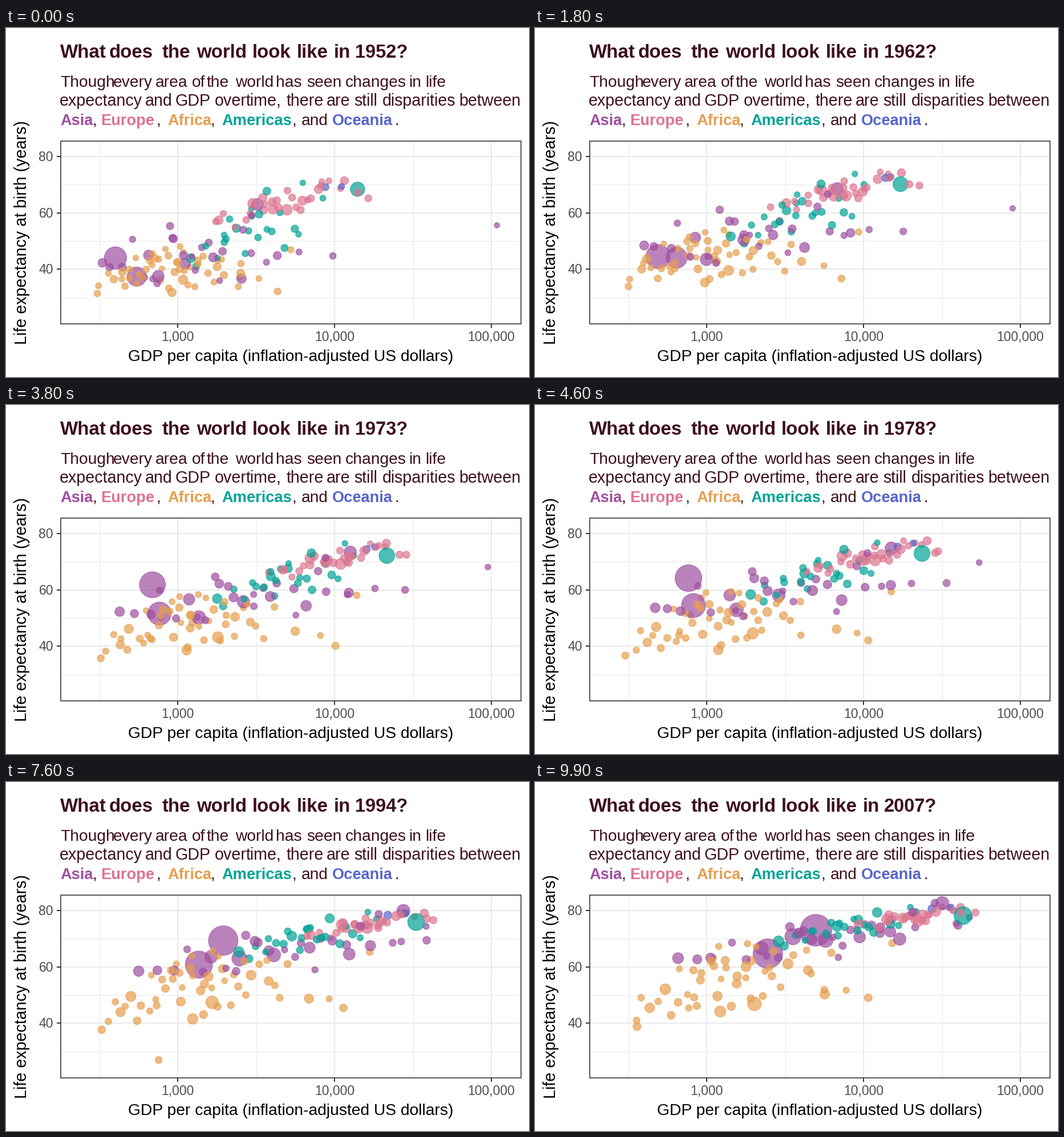
These frames come from a looping animation (917x611 px, 10000 ms). A matplotlib script:

```python
import numpy as np
import matplotlib.pyplot as plt
from matplotlib.animation import FuncAnimation
from matplotlib.patches import Rectangle

W, H, FRAMES = 917, 611, 100
PT = 0.72  # points per pixel at 100 dpi
INK, GREY, LINE, GRID = "#3d0f1d", "#4d4d4d", "#333333", "#ebebeb"
COLORS = {"Asia": "#9e4f9f", "Europe": "#dc758f", "Africa": "#e69f4f",
          "Americas": "#00a396", "Oceania": "#5766c9"}
AS, EU, AF, AM, OC = COLORS

# Region, first and last population (millions), key points (year, income, life).
LANDMARKS = [
    (AS, 556, 1319, (1952, 400, 44), (1957, 576, 50.5), (1962, 488, 44.5),
     (1967, 613, 58.4), (1977, 741, 64), (1992, 1656, 68.7), (2007, 4960, 73)),
    (AS, 372, 1110, (1952, 547, 37.4), (1977, 813, 54.2), (1987, 977, 58.6), (2007, 2450, 64.7)),
    (AS, 82, 224, (1952, 750, 37.5), (2007, 3540, 70.7)),
    (AS, 86, 127, (1952, 3220, 63), (1967, 9850, 71.4), (1992, 26800, 79.4), (2007, 31700, 82.6)),
    (AS, .2, 2.5, (1952, 108400, 55.6), (1967, 80900, 64.6), (1972, 109000, 67.7),
     (1982, 31400, 71.3), (2007, 47300, 77.6)),
    (AF, 33, 135, (1952, 1080, 36.3), (1977, 1980, 44.5), (1992, 1600, 47.5), (2007, 2010, 46.9)),
    (AF, 2.5, 9, (1952, 493, 40), (1987, 848, 44), (1992, 737, 23.6), (2007, 863, 46.2)),
    (AM, 158, 301, (1952, 14000, 68.4), (2007, 43000, 78.2)),
]

# Region, count, mid-period boom in income, typical populations, then at start and end:
# mean log income, its spread, mean life, slope of life over log income, spread of life.
CROWDS = [
    (AS, 23, 0, 9, 24, (3.02, .28, 45, 13, 6), (3.68, .46, 70, 11, 3)),
    (AS, 5, .2, 4, 15, (3.62, .25, 43.5, 15, 3), (4.2, .25, 71.5, 17, 2)),
    (EU, 30, 0, 8, 10, (3.7, .25, 64, 13, 2.4), (4.33, .19, 77.5, 9, 1)),
    (AF, 46, 0, 2.7, 9, (2.95, .23, 39.5, 5, 4), (3.14, .31, 55.5, 15, 6)),
    (AF, 4, .2, 4, 10, (3.57, .12, 38.7, 10, 5), (3.96, .16, 55, 30, 6)),
    (AM, 24, 0, 3.5, 9, (3.47, .21, 54, 22, 5), (3.9, .24, 74, 9, 2)),
    (OC, 2, 0, 4, 9, (4.01, .02, 69.2, 0, .2), (4.47, .09, 80.7, 7, .2)),
]

KEYS = np.arange(1952, 2008, 5)
T = np.linspace(0, 1, len(KEYS))
rng = np.random.default_rng(12)


def radii(p0, p1):
    return 4.5 + 0.64 * (np.sqrt(p0) * (1 - T) + np.sqrt(p1) * T)


def landmark(p0, p1, *points):
    year, income, life = np.array(points).T
    return (np.interp(KEYS, year, np.log10(income)),
            np.interp(KEYS, year, life), radii(p0, p1))


def scores(n):
    """Evenly spread, bell-like scores in random order."""
    q = (2 * np.arange(n) + 1) / n - 1
    return rng.permutation(1.3 * q + 0.8 * q ** 3)


def crowd(n, boom, p0, p1, start, end):
    gain = T ** 0.7  # early years bring most of the progress
    mean, sx, life, slope, sy = (a + (b - a) * gain for a, b in zip(start, end))
    for u, v, size in zip(scores(n), scores(n), np.exp(scores(n))):
        dx = sx * u
        x = mean + dx + boom * np.sin(np.pi * T) + rng.normal(0, 0.02, len(T))
        y = life + slope * dx + sy * v + rng.normal(0, 0.4, len(T))
        yield x, y, radii(p0 * size, p1 * size)


def build():
    dots = [(i / len(LANDMARKS), region, landmark(*spec))
            for i, (region, *spec) in enumerate(LANDMARKS)]
    for region, *spec in CROWDS:
        dots += [(rng.random(), region, path) for path in crowd(*spec)]
    dots.sort(key=lambda d: d[0])
    return [COLORS[d[1]] for d in dots], np.array([d[2] for d in dots])


def px(log_income):
    return 301.3 + 274.9 * (log_income - 3)


def py(life):
    return 225 + 4.935 * (80 - life)


plt.rcParams["font.family"] = "Liberation Sans"
fig = plt.figure(figsize=(W / 100, H / 100), dpi=100, facecolor="white")
ax = fig.add_axes([0, 0, 1, 1])
ax.set(xlim=(0, W), ylim=(H, 0))
ax.axis("off")

LEFT, RIGHT, TOP, BOTTOM = 95.5, 902.5, 198, 517.5


def line(xs, ys, color, width):
    ax.plot(xs, ys, color=color, lw=width * PT, zorder=1, solid_capstyle="butt")


def label(x, y, s, size, color="black", **kw):
    return ax.text(x, y, s, fontsize=size * PT, color=color, va="baseline", **kw)


def words(y, size, text, starts, **kw):
    for x, s in zip(starts, text.split()):
        label(x, y, s, size, INK, **kw)


for half in range(5, 11):
    x = px(half / 2)
    major = half % 2 == 0
    line((x, x), (TOP, BOTTOM), GRID, 2.2 if major else 1.1)
    if major:
        line((x, x), (BOTTOM, BOTTOM + 7), LINE, 2)
        label(x, 548, f"{10 ** (half // 2):,}", 23, GREY, ha="center")

for life in range(30, 81, 10):
    y = py(life)
    major = life % 20 == 0
    line((LEFT, RIGHT), (y, y), GRID, 2.2 if major else 1.1)
    if major:
        line((LEFT - 7, LEFT), (y, y), LINE, 2)
        label(83, y + 8, str(life), 23, GREY, ha="right")

ax.add_patch(Rectangle((LEFT, TOP), RIGHT - LEFT, BOTTOM - TOP, fill=False,
                       ec=LINE, lw=1.6 * PT, zorder=4))
label(499, 583, "GDP per capita (inflation-adjusted US dollars)", 28.3, ha="center")
label(36, 357.5, "Life expectancy at birth (years)", 28.6, ha="center",
      rotation=90, rotation_mode="anchor")

words(52, 33.2, "What does the world look like in",
      (95, 181, 274, 334, 432, 510, 575), weight="bold")
year_text = label(612, 52, "", 32.6, INK, weight="bold")
words(103, 28.2, "Though every area of the world has seen changes in life",
      (95, 188, 262, 326, 352, 402, 473, 527, 595, 706, 735))
words(136.5, 28.6, "expectancy and GDP over time, there are still disparities between",
      (94, 244, 297, 366, 421, 492, 562, 610, 660, 794))
for x, region in zip((95, 166, 283, 378, 572), COLORS):
    label(x, 170, region, 27.3, COLORS[region], weight="bold")
words(170, 28, ", , , , and .", (151, 263, 358, 501, 518, 682))

colors, paths = build()
dots = ax.scatter(px(paths[:, 0, 0]), py(paths[:, 1, 0]), c=colors, alpha=0.7,
                  linewidths=1.2 * PT, zorder=3)


def draw(i):
    year = 1952 + 55 * i / (FRAMES - 1)
    k = min(int((year - 1952) / 5), len(KEYS) - 2)
    f = (year - KEYS[k]) / 5
    x, y, r = (paths[:, :, k] * (1 - f) + paths[:, :, k + 1] * f).T
    dots.set_offsets(np.column_stack([px(x), py(y)]))
    dots.set_sizes((2 * r * PT) ** 2)
    year_text.set_text(f"{round(year)}?")
    return dots, year_text


anim = FuncAnimation(fig, draw, frames=FRAMES, interval=100, repeat=True, repeat_delay=0)
plt.show()
```
